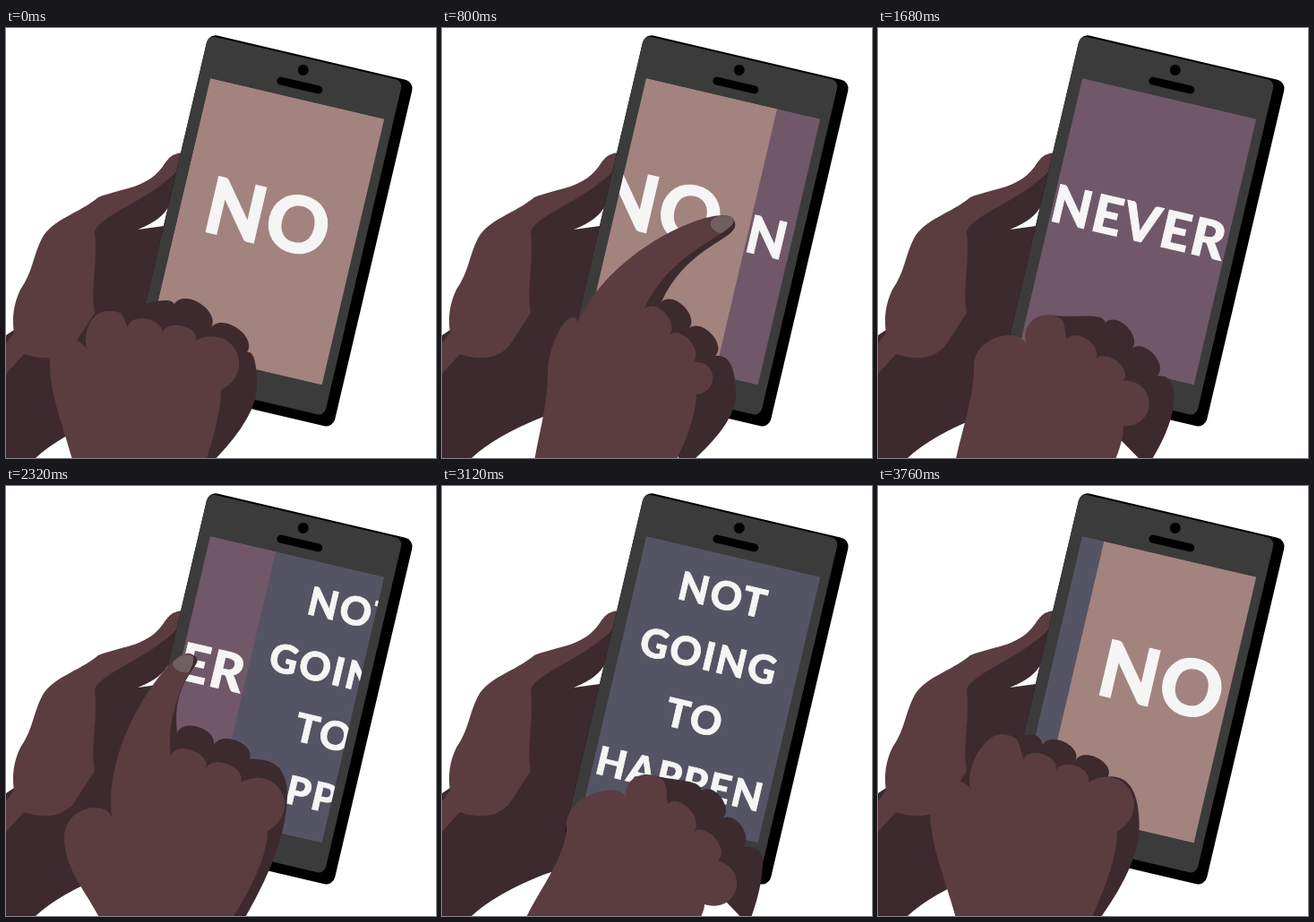
An HTML page with a canvas for the animation above (3840 ms loop, 480x480 px).

```html
<!DOCTYPE html>
<html lang="en">
<head>
<meta charset="utf-8">
<title>Swiping no</title>
<style>
html, body { margin: 0; width: 100%; height: 100%; overflow: hidden; background: #fff; }
canvas { display: block; }
</style>
</head>
<body>
<canvas id="stage" width="480" height="480"></canvas>
<script>
const ctx = document.getElementById('stage').getContext('2d');
const STEP = 80, SWIPE = 16, PAGE_W = 200, PAGE_H = 305, FLOOR = 490;
const SKIN = '#5b3c41', SHADE = '#3d2a2e', NAIL = '#6f5f60', GREY = '#3b3b3b', WHITE = '#f5f5f5';

const pages = [
  { color: '#a3837e', size: 87, top: 168, words: ['NO'] },
  { color: '#705869', size: 58, top: 163, words: ['NEVER'] },
  { color: '#555464', size: 44, top: 60, words: ['NOT', 'GOING', 'TO', 'HAPPEN'] }
];
const LINE_GAP = 70.3;

// Key points of the swiping hand; curves between them follow from rules below.
// wrist: x of left edge, right edge and shaded edge at the floor.
const rest = {
  wrist: [76, 221, 225], thumb: [49, 375], web: [92, 361], tip: [113, 316],
  first: [136, 334], last: [212, 349], heel: [240, 404],
  back: [188, 308], backEnd: [269, 362], side: [280, 400]
};
const reach = {
  wrist: [90, 284, 342], thumb: [139, 378], web: [206, 348], tip: [236, 323],
  first: [252, 355], last: [308, 418], heel: [293, 467],
  back: [290, 340], backEnd: [335, 403], side: [358, 420]
};
const point = {
  wrist: [102, 258, 272], thumb: [118, 385], web: [152, 328], tip: [324, 212],
  first: [226, 313], last: [280, 373], heel: [284, 409],
  back: [245, 306], backEnd: [305, 366], side: [328, 410]
};
const drag = {
  wrist: [108, 248, 262], thumb: [65, 392], web: [118, 369], tip: [205, 187],
  first: [184, 301], last: [262, 331], heel: [292, 385],
  back: [191, 276], backEnd: [272, 305], side: [314, 345]
};
const curl = {
  wrist: [96, 242, 252], thumb: [63, 358], web: [110, 327], tip: [155, 256],
  first: [177, 290], last: [247, 321], heel: [282, 375],
  back: [182, 279], backEnd: [250, 304], side: [298, 370]
};

const keys = [
  { at: 0, pose: rest, power: 1.3 },
  { at: 7, pose: reach, power: 1 },
  { at: 10, pose: point, power: 1 },
  { at: 13, pose: drag, power: 1 },
  { at: 14, pose: curl, power: 1.5 },
  { at: 16, pose: rest }
];

const palm = new Path2D(`M205 150 L100 205 L9 337 L0 343 V480 H33 Q60 455 113 434
  L140 425 L182 230 L176 221 L147 225 Q175 214 182 198 Z`);
const leftThumb = new Path2D(`M200 139 Q186 138 178 150 C160 180 130 178 103 189
  C80 208 52 213 40 235 C30 255 30 272 16 292 Q5 315 9 340 L0 352 V386 L20 364
  Q55 376 75 355 Q88 335 99 318 C94 290 103 260 99 228 C103 208 170 190 200 149 Z`);

const mix = (a, b, u) => a.map((v, i) => v + (b[i] - v) * u);
const add = (p, q, k = 1) => [p[0] + q[0] * k, p[1] + q[1] * k];

function poseAt(phase) {
  const i = keys.findIndex((k, n) => phase < keys[n + 1].at);
  const a = keys[i], b = keys[i + 1];
  const u = ((phase - a.at) / (b.at - a.at)) ** a.power;
  const pose = {};
  for (const part in a.pose) pose[part] = mix(a.pose[part], b.pose[part], u);
  return pose;
}

// Index finger frame: reach from its root, unit direction and unit normal.
function fingerAxis({ web, first, tip }) {
  const reach = add(tip, mix(web, first, 0.5), -1);
  const length = Math.hypot(...reach);
  const dir = [reach[0] / length, reach[1] / length];
  return { reach, length, dir, normal: [-dir[1], dir[0]] };
}

function curve(path, c1, c2, end) {
  path.bezierCurveTo(...c1, ...c2, ...end);
}

function bump(path, a, b, height) {
  const out = [(b[1] - a[1]) * height, (a[0] - b[0]) * height];
  curve(path, add(a, out), add(b, out), b);
}

function knuckles(path, from, to) {
  const crease = mix(from, to, 0.5);
  bump(path, from, crease, 0.45);
  bump(path, crease, to, 0.45);
}

function fingerDown(path, tip, root, axis, width) {
  const bend = add(add(root, axis.reach, 0.4), axis.normal, -0.2 * axis.length);
  curve(path, add(tip, axis.normal, width), bend, root);
}

function skinPath(pose, axis) {
  const { wrist, thumb, web, tip, first, last, heel } = pose;
  const path = new Path2D(), start = [wrist[0], FLOOR];
  path.moveTo(...start);
  curve(path, mix(start, thumb, 0.35), add(thumb, [0, 38]), thumb);
  curve(path, add(thumb, [0, -32]), add(web, [-10, -20]), web);
  const bend = add(add(web, axis.reach, 0.5), axis.normal, -0.25 * axis.length);
  curve(path, bend, add(tip, axis.normal, -20), tip);
  fingerDown(path, tip, first, axis, 20);
  knuckles(path, first, last);
  bump(path, last, heel, 0.75);
  path.quadraticCurveTo(heel[0], heel[1] + 0.35 * (FLOOR - heel[1]), wrist[1], FLOOR);
  path.closePath();
  return path;
}

function shadePath(pose, axis) {
  const { wrist, web, tip, back, backEnd, side } = pose;
  const path = new Path2D();
  path.moveTo(...web);
  path.lineTo(...tip);
  fingerDown(path, tip, back, axis, 30);
  knuckles(path, back, backEnd);
  path.quadraticCurveTo(side[0], backEnd[1] - 3, ...side);
  path.quadraticCurveTo(side[0], side[1] + 0.4 * (FLOOR - side[1]), wrist[2], FLOOR);
  path.closePath();
  return path;
}

function fill(path, color) {
  ctx.fillStyle = color;
  ctx.fill(path);
}

function slab(x, y, w, h, r, color) {
  const path = new Path2D();
  path.roundRect(x, y, w, h, r);
  fill(path, color);
}

function drawPage({ color, size, top, words }, x) {
  ctx.fillStyle = color;
  ctx.fillRect(x, 0, PAGE_W + 1, PAGE_H);
  ctx.fillStyle = ctx.strokeStyle = WHITE;
  ctx.font = `800 ${size}px Lato, sans-serif`;
  ctx.letterSpacing = '2px';
  ctx.textAlign = 'center';
  ctx.lineWidth = size * 0.018;
  words.forEach((word, i) => {
    const at = [x + PAGE_W / 2 - 1, top + i * LINE_GAP];
    ctx.fillText(word, ...at);
    ctx.strokeText(word, ...at);
  });
}

function drawPhone(index, slide) {
  ctx.save();
  ctx.translate(228, 56);
  ctx.rotate(13.2 * Math.PI / 180);
  slab(-13, -48, 235.5, 397, 10, '#000');
  slab(-13, -46, 223, 384, 8, GREY);
  slab(73, -19.5, 52, 9, 4.5, '#000');
  slab(93, -38.5, 12, 12, 6, '#000');
  ctx.beginPath();
  ctx.rect(0, 0, 199.5, PAGE_H);
  ctx.clip();
  drawPage(pages[index], -slide * PAGE_W);
  if (slide > 0) drawPage(pages[(index + 1) % pages.length], (1 - slide) * PAGE_W);
  ctx.restore();
}

function drawHand(phase) {
  const pose = poseAt(phase), axis = fingerAxis(pose);
  const front = skinPath(pose, axis);
  fill(shadePath(pose, axis), SHADE);
  fill(front, SKIN);
  if (phase < 9 || phase > 13) return;
  const nail = new Path2D();
  nail.ellipse(...add(pose.tip, axis.dir, -12), 15, 10, 0.1, 0, 2 * Math.PI);
  ctx.save();
  ctx.clip(front);
  fill(nail, NAIL);
  ctx.restore();
}

function draw(time) {
  const tick = Math.floor(time / STEP) % (SWIPE * pages.length);
  const phase = tick % SWIPE;
  ctx.fillStyle = '#fff';
  ctx.fillRect(0, 0, 480, 480);
  fill(palm, SHADE);
  fill(leftThumb, SKIN);
  drawPhone(Math.floor(tick / SWIPE), Math.max(0, phase - 8) / 8);
  drawHand(phase);
}

let start;
function loop(now) {
  start ??= now;
  draw(now - start);
  requestAnimationFrame(loop);
}
draw(0);
requestAnimationFrame(loop);
</script>
</body>
</html>
```
